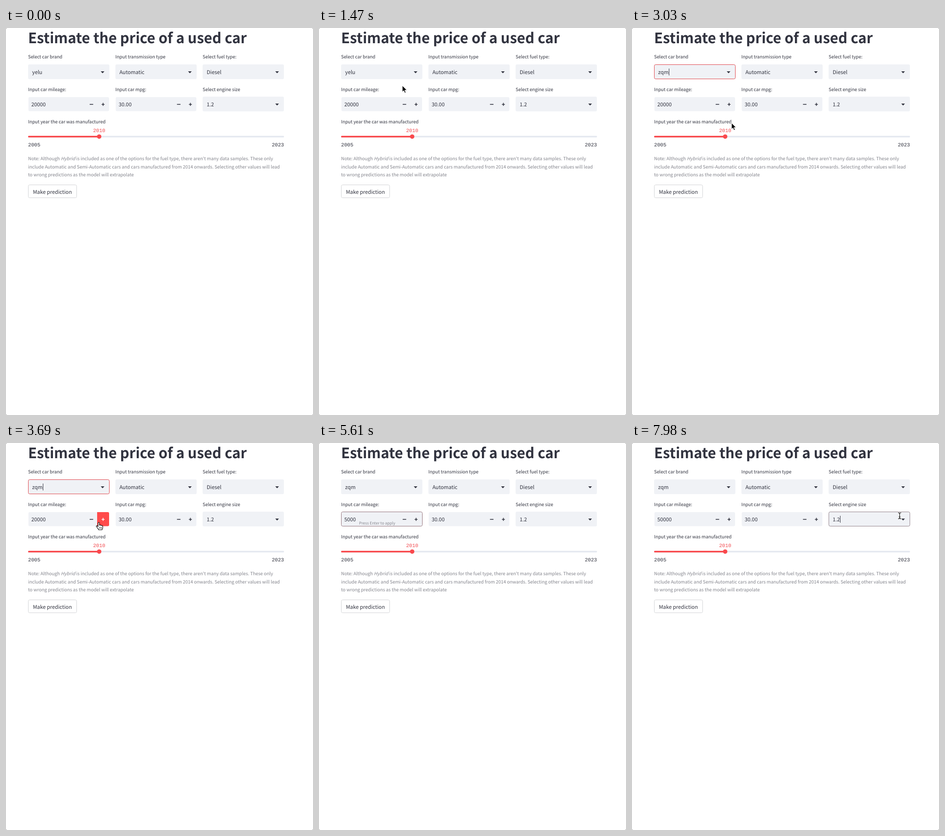
An HTML page for the animation above (8 s loop, 667 px wide and 840 px high).

```html
<!DOCTYPE html>
<html lang="en">
<head>
<meta charset="utf-8">
<title>Used car price form</title>
<style>
  html, body { margin: 0; width: 100%; height: 100%; overflow: hidden; background: #fff; }
  svg { display: block; width: 667px; height: 840px; }
  text {
    font: 11.3px "Noto Sans CJK JP", "Noto Sans CJK SC", "Noto Sans CJK KR", "Noto Sans CJK TC", "Open Sans", sans-serif;
    fill: #31333f;
    text-rendering: geometricPrecision;
    white-space: pre;
  }
  text.title { font-size: 31.1px; font-weight: 700; }
  text.label { font-size: 9.89px; }
  text.note { font-size: 9.89px; fill: #83848c; }
  text.hint { font-size: 8.5px; fill: #83848c; }
  text.mono { font: 11.05px "Liberation Mono", monospace; }
  text.red { fill: #f24a4f; }
  text.option { fill: #50525c; }
  .field { fill: #f0f2f6; }
  .glyph { fill: none; stroke: #31333f; stroke-width: 1.6; }
</style>
</head>
<body>
<svg id="stage" viewBox="0 0 667 840" xmlns="http://www.w3.org/2000/svg"></svg>
<script>
const LOOP = 8000, STEP = 30;
const stage = document.getElementById('stage');
const brands = ['yelu', 'zqm', 'qz'];

const text = (x, y, content, cls = '', extra = '') =>
  `<text x="${x}" y="${y}" class="${cls}" ${extra}>${content}</text>`;
const box = (x, y, w, h, attrs) =>
  `<rect x="${x}" y="${y}" width="${w}" height="${h}" rx="3" ${attrs}/>`;
const select = (x, y, value, id) =>
  box(x, y, 176.6, 32, 'class="field"') +
  text(x + 8.8, y + 20.8, value, '', `id="${id}"`) +
  `<path d="M${x + 157.8} ${y + 15}h8l-4 4.3z" fill="#31333f"/>`;
const number = (x, value, id) =>
  box(x + 0.7, 150, 175.2, 30.5, 'class="field"') +
  `<rect id="${id}Selection" x="${x + 7}" y="157" width="0" height="18" fill="#aecff5"/>` +
  `<path id="${id}Hot" d="M${x + 150} 150h23q3 0 3 3v24.500q0 3-3 3h-23z" fill="#ff4b4b"/>` +
  text(x + 7, 169.8, value, '', `id="${id}"`) +
  `<path class="glyph" d="M${x + 133.8} 165.700h7.600"/>` +
  `<path class="glyph" id="${id}Plus" d="M${x + 159.700} 165.700h6.400m-3.200-3.200v6.400"/>`;
const focusRing = (id, x, y, color) =>
  box(x + 0.5, y + 0.5, 176, 31, `id="${id}" fill="none" stroke="${color}"`);
const caret = id => `<rect id="${id}" width="1" height="15" fill="#31333f"/>`;

stage.innerHTML = `
  <defs>
    <filter id="shadow" x="-20%" y="-20%" width="140%" height="150%">
      <feDropShadow dx="0" dy="3" stdDeviation="5" flood-color="#000" flood-opacity=".18"/>
    </filter>
  </defs>
  <rect width="667" height="840" fill="#777"/>
  <rect width="667" height="840" rx="2.5" fill="#fff"/>` +
  text(48, 32.6, 'Estimate the price of a used car', 'title') +
  [['Select car brand', 48, 66], ['Input transmission type', 237.6, 66], ['Select fuel type:', 427.3, 66],
   ['Input car mileage:', 48, 136.8], ['Input car mpg:', 237.6, 136.8], ['Select engine size', 427.3, 136.8],
   ['Input year the car was manufactured', 48, 207]]
    .map(([label, x, y]) => text(x, y, label, 'label')).join('') +
  select(48, 79, brands[0], 'brand') +
  select(237.7, 79, 'Automatic', 'gearbox') +
  select(427.2, 79, 'Diesel', 'fuel') +
  number(48, '20000', 'mileage') +
  number(237.7, '30.00', 'mpg') +
  select(427.2, 149, '1.2', 'engine') +
  text(87, 176.6, 'Press Enter to apply', 'hint', 'id="hint"') +
  focusRing('brandRing', 48, 79, '#e0474d') +
  focusRing('mileageRing', 48, 149, '#92727b') +
  focusRing('engineRing', 427.2, 149, '#92828a') +
  caret('brandCaret') + caret('engineCaret') +
  `<rect x="48" y="234" width="556" height="3.600" rx="1.6" fill="#e5e9f0"/>
   <rect x="48" y="234" width="155" height="3.600" rx="1.6" fill="#f9494d"/>
   <circle cx="202.400" cy="235.700" r="4.800" fill="#f9494d"/>` +
  text(202.5, 226, '2010', 'mono red', 'text-anchor="middle"') +
  text(48, 256.5, '2005', 'mono') +
  text(604, 256.5, '2023', 'mono', 'text-anchor="end"') +
  ['Note: Although <tspan font-style="italic">Hybrid</tspan> is included as one of the options for the fuel type, there aren\'t many data samples. These only',
   'include Automatic and Semi-Automatic cars and cars manufactured from 2014 onwards. Selecting other values will lead',
   'to wrong predictions as the model will extrapolate']
    .map((line, i) => text(48, 287 + i * 17.7, line, 'note')).join('') +
  box(48.5, 340.5, 105, 28, 'fill="#fff" stroke="#d2d3d6"') +
  text(58.4, 359.8, 'Make prediction') +
  `<g id="menu">
    <rect x="48" y="111.500" width="176.600" height="95" rx="3" fill="#fff" filter="url(#shadow)"/>
    <rect id="hover" x="48" width="176.600" height="31.600" fill="#f0f1f5"/>` +
    brands.map((name, i) => text(60.7, 132.6 + i * 31.6, name, 'option')).join('') +
  `</g>
  <g id="cursor" stroke-linejoin="round">
    <path id="arrow" d="M0 0V13.800L3.200 10.900L5.400 16L7.700 15L5.500 10H9.900Z" fill="#000" stroke="#fff" stroke-width="1"/>
    <g id="beam" fill="none" stroke-linecap="round">
      ${[['#fff', 2.6], ['#000', 1.2]].map(([color, width]) =>
        `<path d="M-3-6.500Q0-6.500 0-4.500Q0-6.500 3-6.500M0-4.500V4.500M-3 6.500Q0 6.500 0 4.500Q0 6.500 3 6.500M-1.500 2.500H1.500" stroke="${color}" stroke-width="${width}"/>`).join('')}
    </g>
    <g id="hand" fill="#fff" stroke="#000" stroke-width="1.100">
      <path d="M-1.500 9V1.200Q-1.300-.3 0-.3T1.500 1.200V6Q3.500 4.700 4.200 6.300Q6 5.400 6.600 7Q8.700 6.700 8.700 8.700V11Q8.700 13 7.300 14.600V16H-.5V14.600Q-2.500 13-3.500 10.900L-5.300 8.500Q-5.500 6.700-3.800 7Z"/>
      <path d="M1.300 10v3.500M3.600 10v3.500M5.900 10v3.500" stroke-width=".8"/>
    </g>
  </g>`;

const el = Object.fromEntries([...stage.querySelectorAll('[id]')].map(node => [node.id, node]));

// Pointer hot spot: time, x, y
const path = [
  [30, 356, 806], [120, 193, 330], [210, 257, 199], [420, 257, 199], [600, 218.5, 122],
  [780, 208, 101], [1080, 208, 101], [1110, 212, 99], [1200, 163, 141], [1350, 163, 141],
  [1650, 208, 101], [1860, 208, 101], [2100, 183, 145.5], [2310, 181, 156], [2760, 181, 156],
  [3090, 224, 217], [3390, 224, 174], [3690, 201.5, 172.5], [3930, 110, 168], [4110, 88, 175],
  [4200, 75, 179], [4560, 38.5, 155], [6240, 42, 156], [6390, 267, 157], [6600, 267, 157],
  [6750, 403, 196], [6900, 450, 207], [7380, 551, 158], [7500, 551, 158], [7680, 581.5, 158]
];
const shapes = [
  [0, ''], [30, 'arrow'], [690, 'beam'], [1140, 'arrow'], [1560, 'beam'], [1920, 'hand'],
  [2850, 'arrow'], [3570, 'hand'], [3780, 'beam'], [4470, 'arrow'], [5160, ''],
  [6240, 'arrow'], [7230, 'beam']
];
const mileages = [
  [0, '20000'], [5160, '5'], [5310, '50'], [5490, '500'], [5610, '5000'], [5970, '50000']
];

const latest = (steps, t) => steps.filter(([start]) => start <= t).pop()[1];
const ramp = (t, from, to) => Math.min(1, Math.max(0, (t - from) / (to - from)));
const between = (t, from, to) => t >= from && t < to;
const show = (node, on) => { node.style.display = on ? '' : 'none'; };
const write = (node, value) => { if (node.textContent !== value) node.textContent = value; };

function pointerAt(t) {
  const i = path.findIndex(([time]) => time > t);
  if (i < 0) return path[path.length - 1].slice(1);
  if (i === 0) return path[0].slice(1);
  const [t0, x0, y0] = path[i - 1], [t1, x1, y1] = path[i];
  const k = ramp(t, t0, t1);
  return [x0 + (x1 - x0) * k, y0 + (y1 - y0) * k];
}

function placeCaret(node, field, y) {
  node.setAttribute('x', Math.round(+field.getAttribute('x') + field.getComputedTextLength() + 0.3));
  node.setAttribute('y', y);
}

function draw(now) {
  const t = Math.floor((now % LOOP) / STEP) * STEP;
  const [x, y] = pointerAt(t);
  const shape = latest(shapes, t);
  el.cursor.setAttribute('transform', `translate(${x} ${y})`);
  for (const name of ['arrow', 'beam', 'hand']) show(el[name], name === shape);

  write(el.brand, brands[t < 2640 ? 0 : 1]);
  const brandFocus = between(t, 1830, 4110);
  show(el.brandRing, brandFocus);
  show(el.brandCaret, brandFocus);
  placeCaret(el.brandCaret, el.brand, 88);

  const opacity = ramp(t, 1800, 1950) * (1 - ramp(t, 2670, 2850));
  show(el.menu, opacity > 0);
  el.menu.setAttribute('opacity', opacity);
  el.hover.setAttribute('y', t < 2130 ? 112 : 143.6);

  write(el.mileage, latest(mileages, t));
  show(el.mileageRing, between(t, 4110, 7860));
  show(el.hint, between(t, 5160, 7380));
  const selected = between(t, 4110, 5160) ? Math.min(32, Math.max(0, 87 - x)) : 0;
  el.mileageSelection.setAttribute('x', 87 - selected);
  el.mileageSelection.setAttribute('width', selected);

  const hot = between(t, 3570, 3720);
  show(el.mileageHot, hot);
  show(el.mpgHot, false);
  el.mileagePlus.style.stroke = hot ? '#fff' : '';

  const engineFocus = t >= 7860;
  show(el.engineRing, engineFocus);
  show(el.engineCaret, engineFocus);
  placeCaret(el.engineCaret, el.engine, 158);
}

const begin = performance.now();
function frame() {
  draw(performance.now() - begin);
  requestAnimationFrame(frame);
}
frame();
</script>
</body>
</html>
```
